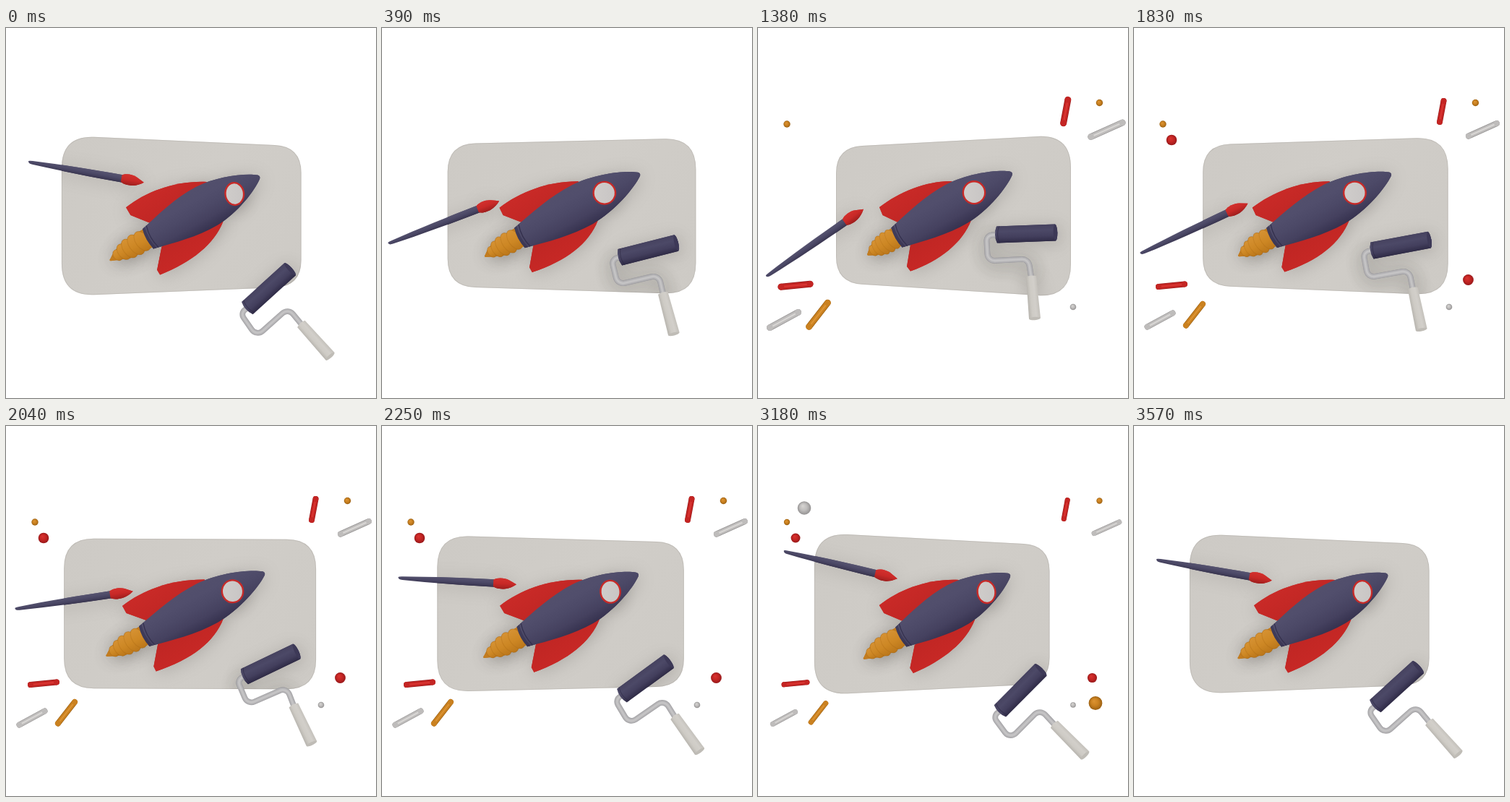
An HTML page with a canvas for the animation above (3600 ms loop, 512x512 px).

```html
<!DOCTYPE html>
<html lang="en">
<head>
<meta charset="utf-8">
<title>Rocket</title>
<style>
html, body { margin: 0; width: 100%; height: 100%; overflow: hidden; background: #fff; }
canvas { display: block; width: 100vw; height: 100vh; }
</style>
</head>
<body>
<canvas id="stage" width="512" height="512"></canvas>
<script>
const ctx = document.getElementById('stage').getContext('2d');
const LOOP = 3600, STEP = 30;
const RED = ['#da3431', '#c42523', '#98191b'];
const ORANGE = ['#dd9433', '#ca8120', '#9c6113'];
const GREY = ['#d8d6d4', '#bebcbb', '#939191'];

// Swing of the whole scene: 0 = turned right, 1 = turned left.
const SWING = [
  [-330, .99], [0, .925], [390, .265], [540, .13], [870, 0], [1400, 0], [1620, .03],
  [1830, .185], [2160, .71], [2250, .78], [2730, 1], [2970, 1], [3240, .99], [3570, .925], [3960, .265]
];
let swing = 0;

const clamp = x => Math.max(0, Math.min(1, x));
const smooth = x => { x = clamp(x); return x * x * (3 - 2 * x); };

function slopeAt(i) {
  const rate = k => (SWING[k + 1][1] - SWING[k][1]) / (SWING[k + 1][0] - SWING[k][0]);
  if (i === 0 || i === SWING.length - 1) return 0;
  const a = rate(i - 1), b = rate(i);
  return a * b > 0 ? 2 * a * b / (a + b) : 0;
}

function swingAt(t) {
  let i = 0;
  while (t >= SWING[i + 1][0]) i++;
  const [t0, v0] = SWING[i], [t1, v1] = SWING[i + 1];
  const h = t1 - t0, u = (t - t0) / h, w = smooth(u);
  return v0 + (v1 - v0) * w + h * u * (1 - u) * ((1 - u) * slopeAt(i) - u * slopeAt(i + 1));
}

// Value between both extremes, with a bulge halfway.
const mix = (a, b, bulge = 0) => a + (b - a) * swing + bulge * 4 * swing * (1 - swing);
const point = (x0, x1, bx, y0, y1, by) => [mix(x0, x1, bx), mix(y0, y1, by)];

function ramp(x0, y0, x1, y1, colors) {
  const g = ctx.createLinearGradient(x0, y0, x1, y1);
  colors.forEach((c, i) => g.addColorStop(i / (colors.length - 1), c));
  return g;
}

function fillPath(d, fill) {
  ctx.fillStyle = fill;
  ctx.fill(new Path2D(d));
}

// Draws in a frame whose x axis runs from a to b and measures `length`.
function along(a, b, length, draw) {
  const dx = b[0] - a[0], dy = b[1] - a[1];
  ctx.save();
  ctx.translate(a[0], a[1]);
  ctx.rotate(Math.atan2(dy, dx));
  ctx.scale(Math.hypot(dx, dy) / length, 1);
  draw();
  ctx.restore();
}

function ellipse(x, y, rx, ry, fill, angle = 0) {
  ctx.fillStyle = fill;
  ctx.beginPath();
  ctx.ellipse(x, y, rx, ry, angle, 0, 7);
  ctx.fill();
}

function slabOutline() {
  const cx = mix(270.5, 240.5), hw = mix(162.5, 162.5, 12);
  const l = cx - hw, r = cx + hw;
  const q = [[l, mix(165, 147.5)], [r, mix(147.5, 165)], [r, mix(373, 356.5)], [l, mix(352.5, 372.5)]];
  const radius = [mix(36, 46), mix(46, 36)];
  const toward = (a, b, d) => {
    const k = d / Math.hypot(b[0] - a[0], b[1] - a[1]);
    return [a[0] + (b[0] - a[0]) * k, a[1] + (b[1] - a[1]) * k];
  };
  const outline = new Path2D();
  q.forEach((c, i) => {
    const d = radius[c[0] === l ? 0 : 1];
    const from = toward(c, q[(i + 3) % 4], d), to = toward(c, q[(i + 1) % 4], d);
    i ? outline.lineTo(...from) : outline.moveTo(...from);
    outline.quadraticCurveTo(...c, ...to);
  });
  outline.closePath();
  return outline;
}

// The slab, with soft contact shadows of everything that lies on it.
function drawSlab() {
  const outline = slabOutline();
  ctx.fillStyle = ramp(80, 150, 430, 370, ['#cdcac5', '#d0cdc8', '#cdcac5']);
  ctx.fill(outline);
  ctx.save();
  ctx.clip(outline);
  ctx.lineWidth = 2;
  ctx.strokeStyle = 'rgba(180,177,172,.55)';
  ctx.stroke(outline);
  ctx.shadowColor = 'rgba(70,66,62,.24)';
  ctx.shadowBlur = 24;
  ctx.shadowOffsetX = 1;
  ctx.shadowOffsetY = 3;
  drawObjects();
  ctx.restore();
}

function drawFins() {
  const a = point(168, 168, -7, 248, 248, 1), b = point(172.5, 174.5, -7, 259, 259, 0);
  const c = point(268, 278, 1.5, 212, 213, 0);
  ctx.fillStyle = ramp(190, 220, 260, 330, ['#cb2b28', '#bd2523', '#c92926']);
  ctx.beginPath();
  ctx.moveTo(...a);
  ctx.bezierCurveTo(a[0] + 28, a[1] - 22, a[0] + 68, a[1] - 37, ...c);
  ctx.lineTo(c[0] + 8, c[1] + 25);
  ctx.lineTo(mix(200, 205), 272);
  ctx.lineTo(...b);
  ctx.closePath();
  ctx.fill();

  const d = point(295, 300, 3, 266, 268, 0), e = point(211, 215, -5.5, 336.5, 342, 0);
  const f = point(206, 210.5, -4, 330, 335, 0), g = point(211, 217, -4, 300, 303, 0);
  ctx.beginPath();
  ctx.moveTo(...d);
  ctx.bezierCurveTo(d[0] - 12, d[1] + 31, d[0] - 43, d[1] + 56, ...e);
  ctx.lineTo(...f);
  ctx.lineTo(...g);
  ctx.lineTo(d[0] - 25, d[1] - 10);
  ctx.closePath();
  ctx.fill();
}

function drawRocket() {
  const base = point(192, 198, -4, 290, 292, 0);
  const nose = point(352, 349, 8, 200, 205.5, 0);
  const tip = point(152, 147, -10, 314, 322, 0);

  along(base, tip, 58, () => {
    fillPath('M0-13 L34-11 Q46-6 58-1 Q60 1 57 2 Q48 9 34 13 L0 15Z', '#c27c20');
    [[46, 8, 6], [37, 12, 7.5], [28, 14.5, 8.5], [18, 15.5, 9], [8, 15, 9]].forEach(([x, r, w]) => {
      ellipse(x, 1.2, w, r, ramp(0, r, 0, -r, ['#d59132', '#cd8724', '#b9751a']), -.12);
      ctx.strokeStyle = 'rgba(160,98,16,.28)';
      ctx.lineWidth = 1;
      ctx.stroke();
    });
  });

  along(base, nose, 176, () => {
    const shade = ramp(0, -30, 0, 30, ['#524f6c', '#514e6c', '#4c4967', '#45415f', '#36324f']);
    fillPath('M0-15.5 C30-23 60-31 92-30.5 C125-29 160-14 174-3 Q177 0 174 3 ' +
      'C160 14 125 29 92 30.5 C60 31 30 23 0 15.5 Q-4 0 0-15.5Z', shade);
    ctx.strokeStyle = '#34304d';
    ctx.lineWidth = 1.2;
    ctx.stroke(new Path2D('M7-17 Q2 0 7 17'));
    fillPath('M0-15.5 L4-16.5 Q0 0 4 16.5 L0 15.5 Q-4 0 0-15.5Z', 'rgba(48,44,74,.5)');
  });

  const [wx, wy] = point(299, 316, 5.5, 227.7, 229.7, 0);
  const rx = mix(16.4, 13.5, 1), tilt = mix(0, -.12);
  ellipse(wx, wy, rx, 16.6, '#c72a28', tilt);
  ellipse(wx, wy, rx - 2.4, 14.2, ramp(wx - 12, wy, wx + 12, wy, ['#cfccca', '#c9c6c5']), tilt);
}

function drawBrush() {
  const tail = point(11.5, 36, -12, 344, 172.5, 0);
  const tip = point(145.5, 192.5, 4.8, 251, 211, -1);
  along(tail, tip, 161, () => {
    fillPath('M0-1.3 Q1-2.3 6-2.4 C45-4.4 90-5.2 131-5.2 L132 5.2 C90 5.2 45 4.4 6 2.4 Q0 2.3 0-1.3Z',
      ramp(0, -5, 0, 5, ['#56536f', '#4b4866', '#39354f']));
    fillPath('M130-4.8 C135-8.3 145-8.3 151-5.4 Q157-2.5 161.5 0 Q155 5.2 147 6.9 C138 8.4 132 6.3 130 4.4Z',
      ramp(0, -7, 0, 7, ['#d2302d', '#c82927', '#a01f1e']));
  });
}

function drawRoller() {
  const left = point(330.5, 335, -3, 286, 395, 3), right = point(412, 391.5, 1.5, 283, 337.5, 0);
  const c1 = point(316, 325, -1, 287, 402, 3), c2 = point(318, 349, 0, 322.5, 434, 4);
  const c3 = point(374, 390, 6, 319.5, 392, 4);
  const grip = point(378, 410, 3, 344, 413, 6), end = point(383, 453, 3, 402, 456, 9);

  ctx.beginPath();
  ctx.moveTo(...left);
  ctx.arcTo(...c1, ...c2, 8);
  ctx.arcTo(...c2, ...c3, 10);
  ctx.arcTo(...c3, ...grip, 10);
  ctx.lineTo(...grip);
  [[7.8, '#a3a2a5'], [6, '#b6b5b7'], [2.5, '#c5c4c5']].forEach(([w, color]) => {
    ctx.lineWidth = w;
    ctx.strokeStyle = color;
    ctx.stroke();
  });

  along(grip, end, 59, () => {
    fillPath('M0-7 Q-3 0 0 7 L59 8 Q62 0 59-8Z',
      ramp(0, -8, 0, 8, ['#c3c0ba', '#d2cfca', '#cecbc5', '#b7b4ae']));
    ellipse(59, 0, 2.2, 7.8, '#bfbcb6');
  });

  along(left, right, 81, () => {
    fillPath('M0-11.6 Q-5 0 0 11.6 L80.5 11.6 Q86 0 80.5-11.6Z',
      ramp(0, -12, 0, 12, ['#46425f', '#4c4967', '#433f5d', '#2e2a45']));
    ellipse(80.5, 0, 2.8, 11.3, '#3d3957');
    ctx.strokeStyle = 'rgba(40,36,62,.5)';
    ctx.lineWidth = 1;
    ctx.stroke(new Path2D('M3.5-11.5 Q-1.5 0 3.5 11.5'));
  });
}

function drawObjects() {
  drawFins();
  drawRocket();
  drawBrush();
  drawRoller();
}

const BALLS = [
  [40, 133, 4.7, ORANGE, 450, 190], [436, 386, 4.3, GREY, 450, 190],
  [472.5, 103.5, 4.7, ORANGE, 1140, 200],
  [52, 155, 7.3, RED, 1590, 210], [462.5, 348.5, 7.4, RED, 1590, 210],
  [64, 113.5, 10.5, GREY, 2310, 240], [467, 383.5, 10.6, ORANGE, 2310, 240]
];
const STICKS = [
  [428.5, 101, 423, 130, RED], [463, 149.5, 502, 132, GREY],
  [34, 358, 70, 354.5, RED], [18.5, 413.5, 53.5, 394.5, GREY], [95, 382, 72, 411.5, ORANGE]
];

const shrink = t => 1 - smooth((t - 3120) / 285);

function drawBall([x, y, r, [light, base, dark], start, grow], t) {
  r *= smooth((t - start) / grow) * shrink(t);
  if (r < .1) return;
  const g = ctx.createRadialGradient(x - r * .25, y - r * .35, 0, x, y, r);
  g.addColorStop(0, light);
  g.addColorStop(.55, base);
  g.addColorStop(1, dark);
  ellipse(x, y, r, r, g);
}

function drawStick([x0, y0, x1, y1, [light, base, dark]], t) {
  const pop = 1.18 * smooth((t - 1140) / 180) - .18 * smooth((t - 1320) / 150);
  const size = pop * shrink(t);
  if (size < .02) return;
  const dx = x1 - x0, dy = y1 - y0, half = Math.hypot(dx, dy) / 2;
  ctx.save();
  ctx.translate((x0 + x1) / 2, (y0 + y1) / 2);
  ctx.rotate(Math.atan2(dy, dx));
  ctx.scale(size, size);
  ctx.lineCap = 'round';
  ctx.beginPath();
  ctx.moveTo(-half, 0);
  ctx.lineTo(half, 0);
  [[8, dark], [6.6, base], [2, light]].forEach(([w, color]) => {
    ctx.lineWidth = w;
    ctx.strokeStyle = color;
    ctx.stroke();
  });
  [-half, half].forEach(x => ellipse(x, 0, 3.9, 3.9, base));
  ctx.restore();
}

function render(now) {
  const t = Math.floor(now % LOOP / STEP) * STEP;
  swing = swingAt(t);
  ctx.fillStyle = '#fff';
  ctx.fillRect(0, 0, 512, 512);
  drawSlab();
  drawObjects();
  STICKS.forEach(s => drawStick(s, t));
  BALLS.forEach(b => drawBall(b, t));
}

let began;
function tick(now) {
  began ??= now;
  render(now - began);
  requestAnimationFrame(tick);
}
render(0);
requestAnimationFrame(tick);
</script>
</body>
</html>
```
